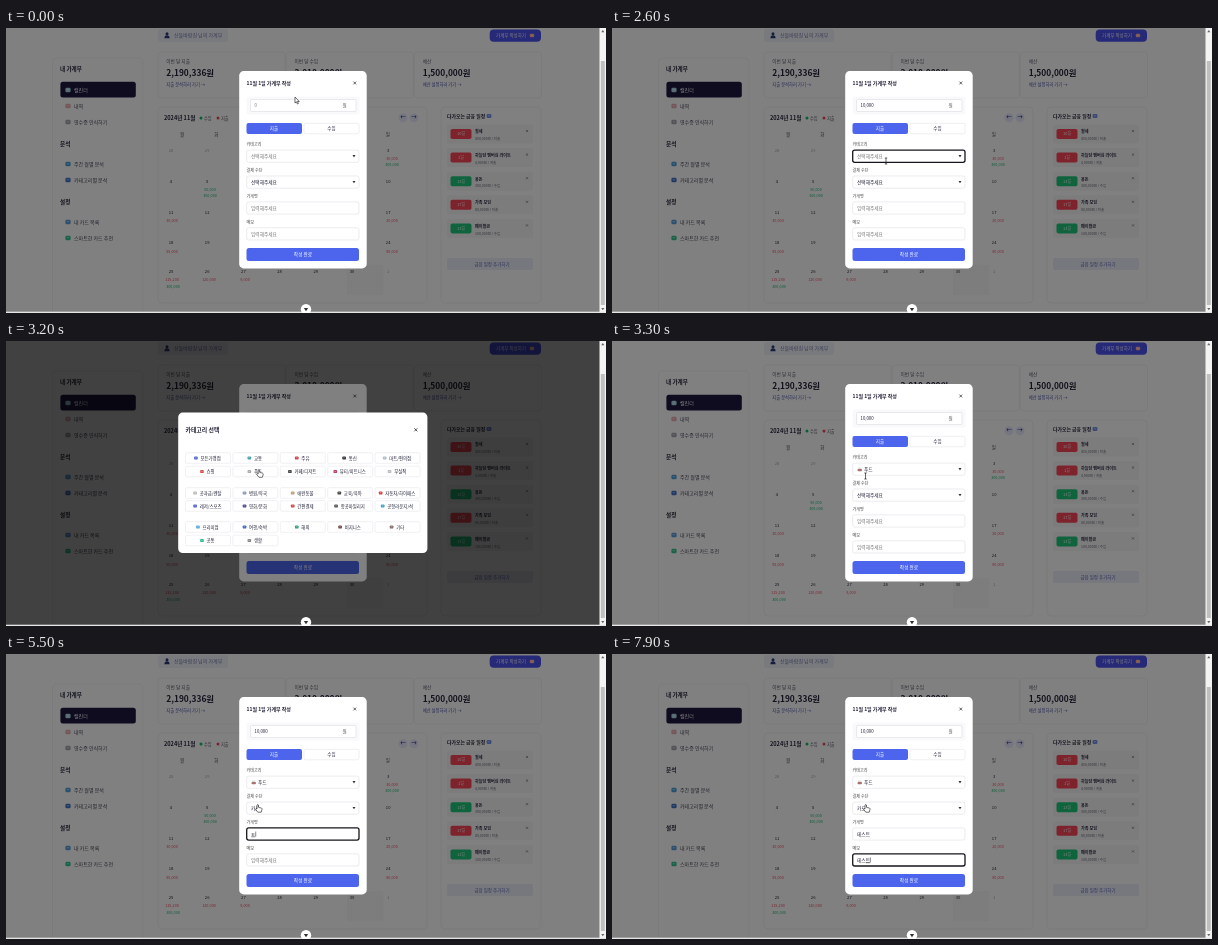
An HTML page that plays this animation: 600x285 px, repeating every 8 s.

```html
<!DOCTYPE html>
<html>
<head>
<meta charset="utf-8">
<style>
html, body { margin: 0; width: 100%; height: 100%; overflow: hidden; background: #808080; }
svg { display: block; width: 600px; height: 285px; }
text { font-family: "Noto Sans CJK KR", "Noto Sans CJK", "Noto Sans", sans-serif; white-space: pre; }
.list { filter: drop-shadow(0 2px 3px #0009); }
</style>
</head>
<body>
<svg id="stage" viewBox="0 0 600 285"></svg>
<script>
const NS = 'http://www.w3.org/2000/svg';
const stage = document.getElementById('stage');
const BLUE = '#4c65ec', INK = '#23233a', RED = '#f0485a', GREEN = '#12b76a';
let parent = stage;

function el(name, attrs) {
  const node = document.createElementNS(NS, name);
  for (const key in attrs) node.setAttribute(key, attrs[key]);
  return parent.appendChild(node);
}
function group(draw) {
  const outer = parent, g = el('g', {});
  parent = g;
  draw();
  parent = outer;
  return g;
}
// Rectangle given by its edges.
const box = (x1, y1, x2, y2, fill, r = 0, stroke = 'none', width = .6) =>
  el('rect', { x: x1, y: y1, width: x2 - x1, height: y2 - y1, rx: r, fill, stroke, 'stroke-width': width });
// Text placed by its vertical middle.
function text(str, x, y, size, fill = INK, weight = 400, anchor = 'start') {
  const node = el('text', { x, y: y + size * .36, 'font-size': size, fill, 'font-weight': weight, 'text-anchor': anchor });
  node.textContent = str;
  return node;
}
const mid = (str, x, y, size, fill, weight) => text(str, x, y, size, fill, weight, 'middle');
const path = (d, fill, stroke = 'none', width = .6) => el('path', { d, fill, stroke, 'stroke-width': width });
const dot = (x, y, r, fill) => el('circle', { cx: x, cy: y, r, fill });
const cross = (x, y, r, color, w) => path(`M${x - r} ${y - r}l${2 * r} ${2 * r}m0 ${-2 * r}l${-2 * r} ${2 * r}`, 'none', color, w);
const down = (x, y) => path(`M${x - 1.5} ${y - 1}h3l-1.5 2.4z`, '#333');
const show = (node, on) => node.setAttribute('display', on ? 'inline' : 'none');

function icon(x, y, color, r = 2.3) {
  box(x - r, y - r * .85, x + r, y + r * .85, color, r * .5);
  box(x - r * .5, y - r * .3, x + r * .4, y + r * .1, '#ffffff77');
}

function sidebar() {
  box(46.5, 30, 137, 300, '#fff', 4, '#ececf2');
  box(54.4, 53.8, 129.8, 69.6, '#1d173f', 2.5);
  [['내 가계부', 41], ['분석', 116], ['설정', 174]].forEach(([s, y]) => text(s, 54, y, 5.6, INK, 700));
  [['캘린더', 62, '#a9d7e8'], ['내역', 78, '#e8aab0'], ['영수증 인식하기', 94, '#a4a4b0'],
   ['주간 월별 분석', 136, '#4aa0d8'], ['카테고리별 분석', 152, '#3f74c9'],
   ['내 카드 목록', 194, '#5b9bd8'], ['스마트한 카드 추천', 210, '#2ec48c']].forEach(([s, y, c], i) => {
    icon(62, y, c, 2.6);
    text(s, 68, y, 5, i ? '#44445a' : '#fff');
  });
}

function summary() {
  box(152, 1, 222, 14, '#f0f2fb', 2.5);
  dot(161, 5.7, 1.5, '#2c3a77');
  path('M158.4 10.2q0-3 2.6-3t2.6 3z', '#2c3a77');
  text('산들바람길 님의 가계부', 168, 7.5, 5, '#7079a6');
  box(483.7, 1.5, 535, 13.7, '#4b50ee', 4);
  text('가계부 작성하기', 490, 7.5, 4.5, '#fff', 500);
  icon(526, 7.5, '#ffb49a', 2.2);
  [['이번 달 지출', '2,190,336원', '지출 분석하러 가기 →'],
   ['이번 달 수입', '3,010,000원', '수입 분석하러 가기 →'],
   ['예산', '1,500,000원', '예산 설정하러 가기 →']].forEach(([label, value, link], i) => {
    const x = 152 + i * 128.2;
    box(x, 24, x + 127, 70, '#fff', 3, '#e9e9f0');
    text(label, x + 8.3, 33, 4.7, '#555566');
    text(value, x + 8.3, 45, 8.4, INK, 700);
    text(link, x + 8.3, 56, 4.3, '#4650a8');
  });
}

function calendar() {
  box(152, 79, 421, 275, '#fff', 4, '#e9e9f0');
  text('2024년 11월', 158, 90, 5.6, INK, 700);
  [[GREEN, '수입', 195], [RED, '지출', 212]].forEach(([c, s, x]) => {
    dot(x, 90, 1.5, c);
    text(s, x + 3, 90, 4.2, '#555566');
  });
  [397, 408].forEach((x, i) => {
    dot(x, 89.7, 4.5, '#e9ebfc');
    mid(i ? '→' : '←', x, 89.5, 5.5, '#3a429a', 700);
  });
  [...'월화수목금토일'].forEach((s, i) => mid(s, 176 + i * 34.3, 106, 4.5, '#444455'));
  box(341, 237, 377.5, 267, '#f9f9fa', 1);
  const rows = [122, 153, 184, 214, 243];
  for (let i = 0; i < 35; i++) {
    const n = i - 3, other = n < 1 || n > 30;
    mid(n < 1 ? n + 31 : n > 30 ? n - 30 : n, 165 + i % 7 * 36.2, rows[i / 7 | 0], 4.2, other ? '#aaaab4' : INK, 500);
  }
  [['50,000', 204, 162, 1], ['300,000', 204, 168, 1], ['30,000', 386, 130.5, 0], ['300,000', 386, 137, 1],
   ['30,000', 166, 193, 0], ['20,000', 386, 193, 0], ['55,000', 166, 224, 0], ['80,000', 386, 224, 0],
   ['115,200', 166, 252, 0], ['300,000', 167, 258.5, 1], ['120,000', 203, 252, 0], ['9,000', 239, 252, 0]
  ].forEach(([s, x, y, plus]) => mid(s, x, y, 3.8, plus ? GREEN : RED));
}

function schedule() {
  box(435, 79, 535, 275, '#fff', 4, '#e9e9f0');
  text('다가오는 금융 일정', 441, 88, 4.9, INK, 700);
  icon(483, 88, '#7890e8', 2.4);
  [['10일', '월세', '450,000원 / 지출'], ['1일', '하늘담 멤버십 라이트', '4,900원 / 지출'],
   ['13일', '용돈', '300,000원 / 수입'], ['17일', '가족 모임', '80,000원 / 지출'],
   ['13일', '페이월급', '100,000원 / 수입']].forEach(([day, name, sum], i) => {
    const y = 106 + i * 23.6;
    box(441, y - 9.5, 527, y + 9.5, '#f6f6f9', 2);
    box(444.5, y - 5, 465.5, y + 5, sum.endsWith('수입') ? '#1fc77a' : '#fa4658', 1.8);
    mid(day, 455, y, 4, '#fff', 500);
    text(name, 469, y - 2, 4.1, INK, 700);
    text(sum, 469, y + 5, 3.5, '#62626e');
    cross(521, y - 3, 1.1, '#555', .5);
  });
  box(441, 230, 527, 242, '#eceefb', 2);
  mid('금융 일정 추가하기', 486, 236, 4.5, '#5560b4');
}

group(() => {
  box(0, 0, 600, 285, '#fff');
  sidebar();
  summary();
  calendar();
  schedule();
});
box(0, 0, 600, 285, '#0000007f');

const form = {};
group(() => {
  box(233.2, 43.1, 360.7, 240.4, '#fff', 4.5);
  text('11월 1일 가계부 작성', 240.5, 55, 5, INK, 700);
  cross(348.8, 55, 1.4, '#222', .7);
  box(240.5, 68.5, 353.5, 86.5, '#f9f9fb', 2);
  box(244.5, 71.5, 350, 83.5, '#fff', 1, '#dcdce2');
  form.amount = text('', 248.5, 77.5, 4.3);
  mid('원', 338.5, 77.3, 4.5, '#555');
  box(240.5, 95, 296, 106, BLUE, 2);
  mid('지출', 268, 100.5, 4.5, '#fff', 500);
  box(298, 95.3, 353, 105.8, '#fff', 2, '#e4e4ea');
  mid('수입', 325.5, 100.5, 4.5);
  ['카테고리', '결제 수단', '가게명', '메모'].forEach((s, i) => {
    const y = 128.3 + i * 25.9;
    text(s, 240.5, y - 11.5, 4.1, '#444');
    form['box' + i] = box(240.7, y - 6.2, 353, y + 6, '#fff', 2);
    form['text' + i] = text('', 245, y, 4.7);
    if (i < 2) down(348, y - .3);
  });
  form.food = group(() => {
    box(245.5, 128, 250, 130.2, '#a8726a', 1);
    box(246, 126.6, 249.5, 128, '#ddd');
  });
  form.caret = path('', 'none', '#111', .5);
  form.underline = path('', 'none', '#111', .5);
  box(240.5, 220, 353, 233, BLUE, 2.5);
  mid('작성 완료', 297, 226.5, 4.7, '#fff', 500);
});

const options = [];
const menu = group(() => {
  box(240.7, 160.8, 353, 198, '#fff', 0, '#aaa', .4);
  ['선택해주세요', '현금', '카드', '이체'].forEach((s, i) => {
    const y = 165.5 + i * 9.3;
    options.push({ bar: box(241, y - 4.6, 352.7, y + 4.6, '#2f66c8'), label: text(s, 245, y, 4.7) });
  });
});
menu.setAttribute('class', 'list');

const shade = box(0, 0, 600, 285, '#0000007f');

const picker = group(() => {
  box(172.2, 71.6, 421.4, 212.1, '#fff', 4.5);
  text('카테고리 선택', 179.5, 89, 5.9, INK, 700);
  cross(409.8, 88.8, 1.5, '#222', .8);
  const rows = [
    [117, '모든가맹점 교통 주유 통신 마트/편의점', '#5665c8 #4aa0a8 #d04050 #334 #aebdc8'],
    [130.5, '쇼핑 푸드 카페/디저트 뷰티/피트니스 무실적', '#d65050 #aaa #444 #c04060 #bbb'],
    [152, '공과금/렌탈 병원/약국 애완동물 교육/육아 자동차/하이패스', '#bbb #8897b8 #c49b78 #444 #d84040'],
    [165, '레저/스포츠 영화/문화 간편결제 항공마일리지 공항라운지/석', '#5460d0 #4a4a90 #d04848 #555 #45a0c8'],
    [186, '프리미엄 여행/숙박 해외 비지니스 기타', '#58a8d8 #4068b8 #30a080 #704848 #886a6a'],
    [199.5, '공통 생활', '#30b890 #888']
  ];
  for (const [y, names, colors] of rows) {
    const tint = colors.split(' ');
    names.split(' ').forEach((s, i) => {
      const x = 202 + i * 47.4, half = s.replace('/', '').length * 2.02 + (s.includes('/') ? .8 : 0);
      box(x - 22.5, y - 5.3, x + 22.5, y + 5.3, '#fff', 1.5, '#e2e2e8', .5);
      icon(x - half - 2, y, tint[i], 1.8);
      mid(s, x + 2.6, y, 4.4, INK, 500);
    });
  }
});

// Browser frame.
box(593.5, 0, 600, 285, '#f3f3f3');
box(594.8, 33, 598.8, 277, '#bfbfbf');
path('M595.2 4.2h3.2l-1.6-2.2z', '#666');
path('M595.2 280h3.2l-1.6 2.2z', '#666');
box(0, 283.7, 600, 285, '#e6e6e6');
dot(300, 281.3, 5.2, '#fff');
path('M297.8 280h4.4l-2.2 3.2z', '#333');

const pointers = {
  arrow: group(() => path('M0 0v6l1.4-1.2 1 2.2 1-.5-1-2h1.9z', '#fff', '#111', .6)),
  beam: group(() => path('M-1.2-3h2.4M0-3v6M-1.2 3h2.4', 'none', '#222', .7)),
  hand: group(() => path('M-1 1v-4q.8-1 1.5 0v2.3l3 .8q.8.3.5 1.5l-.8 2.6h-3.4l-2.3-2.9q.5-1 1.5-.3z', '#fff', '#111', .6))
};

// Moments of the visible actions, in ms.
const OPEN = 2700, PICKED = 3300, LIST = 4000, PAID = 4800, SHOP = 5200, MEMO = 6600;

// Latest entry whose start time has passed.
const at = (steps, t) => steps.reduce((v, [start, value]) => t >= start ? value : v, '');
const keys = (list, start, gap) => list.map((s, i) => [start + i * gap, s]);
const syllables = ['ㅌ', '테', '텟', '테스', '테슽', '테스트'];
const amounts = keys(['1', '10', '100', '1,000', '10,000'], 900, 150);
const shop = keys(syllables, 5500, 120), memo = keys(syllables, 7000, 120);
const focuses = [[0, ''], [500, 'amount'], [2500, 0], [OPEN, ''], [LIST - 100, 1], [SHOP, 2], [MEMO, 3]];
// Time, x, y of the pointer's path.
const route = [[0, 289, 69], [400, 282, 76], [1700, 281, 77], [2400, 274, 132], [2600, 274, 133], [OPEN, 274.5, 133],
  [3150, 253, 131], [PICKED, 253.5, 135], [3800, 264, 154], [4100, 264, 158], [4450, 264, 181],
  [PAID, 263, 182], [5300, 252, 153], [5500, 252, 154], [7900, 254, 154], [8000, 254, 154]];
const shapes = [[0, 'arrow'], [300, 'beam'], [OPEN, 'arrow'], [2950, 'hand'], [PICKED, 'beam'], [3600, 'arrow'], [5100, 'hand']];

function pointerAt(t) {
  const i = route.findIndex(p => p[0] > t);
  const [t0, x0, y0] = route[i - 1], [t1, x1, y1] = route[i];
  const k = (t - t0) / (t1 - t0), e = k * k * (3 - 2 * k);
  return [x0 + (x1 - x0) * e, y0 + (y1 - y0) * e];
}

function fill(node, value, hint, hintColor = '#777') {
  node.textContent = value || hint;
  node.setAttribute('fill', value ? INK : hintColor);
}

function drawCaret(focus, value) {
  const field = focus === 'amount' ? form.amount : focus > 1 ? form['text' + focus] : null;
  let caret = '', line = '';
  if (field) {
    const end = +field.getAttribute('x') + (value ? field.getComputedTextLength() : 0);
    const y = +field.getAttribute('y') - 1.7;
    caret = `M${end + .4} ${y - 2.6}v5.2`;
    if (focus > 1 && value) line = `M${end - 4.2} ${y + 2.7}h4`;
  }
  form.caret.setAttribute('d', caret);
  form.underline.setAttribute('d', line);
}

function draw(t) {
  const focus = at(focuses, t), picking = t >= OPEN && t < PICKED, picked = t >= PICKED;
  const amount = at(amounts, t);
  const values = [picked ? '푸드' : '', t >= PAID ? '카드' : '', at(shop, t), at(memo, t)];
  fill(form.amount, amount, '0');
  show(form.food, picked);
  form.text0.setAttribute('x', picked ? 252 : 245);
  values.forEach((v, i) => {
    fill(form['text' + i], v, i < 2 ? '선택해주세요' : '입력해주세요', i === 1 ? INK : '#777');
    const [color, width] = focus !== i ? ['#e0e0e6', .6] : i === 1 ? ['#8085ee', .8] : ['#14141c', 1.3];
    form['box' + i].setAttribute('stroke', color);
    form['box' + i].setAttribute('stroke-width', width);
  });
  drawCaret(focus, focus === 'amount' ? amount : values[focus]);

  show(menu, t >= LIST && t < PAID);
  const chosen = at([[0, 0], [4230, 1], [4330, 2]], t);
  options.forEach(({ bar, label }, i) => {
    show(bar, i === chosen);
    label.setAttribute('fill', i === chosen ? '#fff' : '#222');
  });
  show(shade, picking);
  show(picker, picking);

  const shape = at(shapes, t), [px, py] = pointerAt(t);
  for (const name in pointers) show(pointers[name], name === shape);
  pointers[shape].setAttribute('transform', `translate(${px} ${py})`);
}

function loop() {
  draw(performance.now() % 8000);
  requestAnimationFrame(loop);
}
loop();
</script>
</body>
</html>
```
